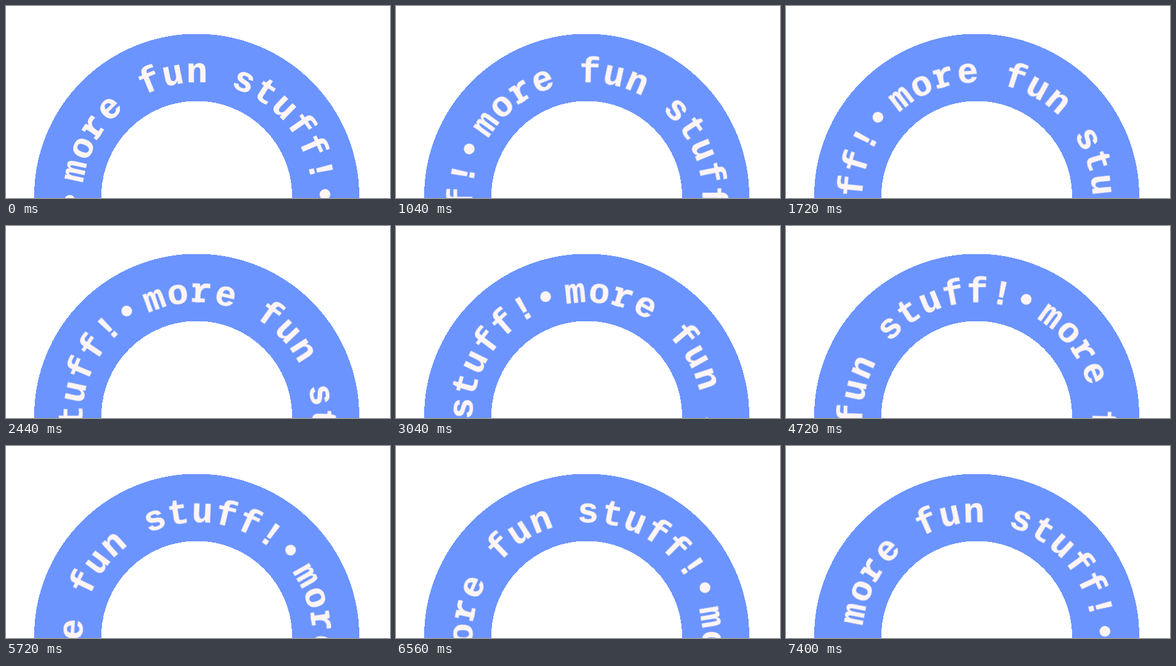
An HTML page that plays this animation: 600x300 px, repeating every 7840 ms.

```html
<!DOCTYPE html>
<html lang="en">
<head>
<meta charset="utf-8">
<title>Rotating ring text</title>
<style>
  html, body { margin: 0; width: 100%; height: 100%; overflow: hidden; background: #fff; }
  svg { display: block; width: 600px; height: 300px; }
  .ring { fill: none; stroke: #6b94ff; stroke-width: 105; shape-rendering: crispEdges; }
  .label {
    fill: #fff5f4;
    font: bold 54.5px "Liberation Mono", "DejaVu Sans Mono", monospace;
    text-anchor: middle;
    animation: turn 7840ms infinite;
  }
  .label text { stroke: #fff5f4; stroke-width: 0.7; }
  /* Advances every 40 ms, then rests before the loop restarts. */
  @keyframes turn {
    0%       { transform: rotate(0deg);     animation-timing-function: steps(26); }
    13.2653% { transform: rotate(23.6deg);  animation-timing-function: steps(35); }
    31.1224% { transform: rotate(57.7deg);  animation-timing-function: steps(31); }
    46.9387% { transform: rotate(87.7deg);  animation-timing-function: steps(26); }
    60.2040% { transform: rotate(113.8deg); animation-timing-function: steps(25); }
    72.9591% { transform: rotate(138.2deg); animation-timing-function: steps(42); }
    94.3877%, 100% { transform: rotate(178.6deg); }
  }
</style>
</head>
<body>
<svg viewBox="0 0 600 300">
  <circle class="ring" cx="298" cy="297.5" r="201.5"/>
  <g transform="translate(299 299)"><g class="label" id="label"></g></g>
</svg>
<script>
  const label = document.getElementById('label');
  const phrase = 'more fun stuff!';
  const firstAngle = -77.8, pitch = 11.08, dotAngle = -91.3;
  const baseline = 180, dotOrbit = 199.5;

  function add(tag, angle, attrs, text = '') {
    const el = document.createElementNS('http://www.w3.org/2000/svg', tag);
    el.setAttribute('transform', `rotate(${angle})`);
    for (const key in attrs) el.setAttribute(key, attrs[key]);
    el.textContent = text;
    label.append(el);
  }

  // Slab foot and top serif that the plain "r" lacks.
  const serifs = `M-15 ${-baseline}h20v-6h-20z M-15 ${-baseline - 29}h9v6h-9z`;

  for (const half of [0, 180]) {
    add('circle', half + dotAngle, { cy: -dotOrbit, r: 8.4 });
    [...phrase].forEach((char, i) => {
      const angle = half + firstAngle + pitch * i;
      if (char !== ' ') add('text', angle, { y: -baseline }, char);
      if (char === 'r') add('path', angle, { d: serifs });
    });
  }
</script>
</body>
</html>
```
